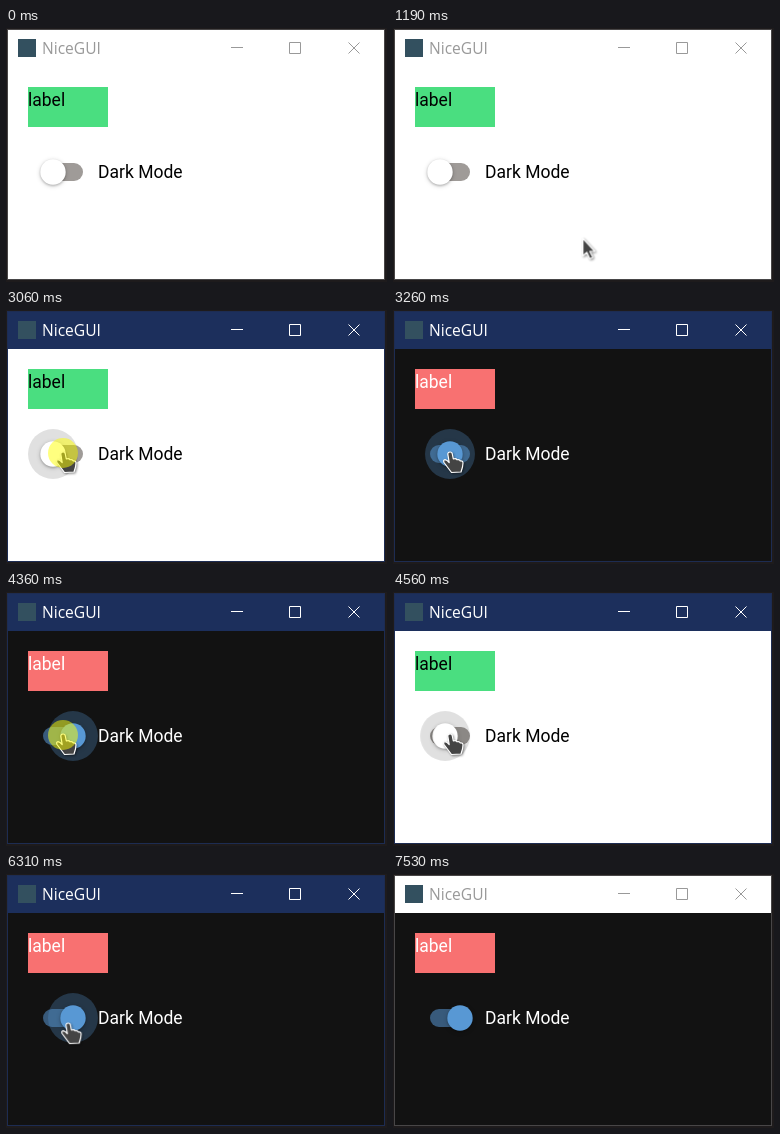
Recreate the animation shown at these times as an HTML page. Size 381x254 px, loop 7650 ms.

```html
<!DOCTYPE html>
<html lang="en">
<head>
<meta charset="utf-8">
<title>Dark mode switch</title>
<style>
  html, body { margin: 0; width: 100%; height: 100%; overflow: hidden; background: #1e1b1c; }
  svg { display: block; width: 100%; height: 100%; }

  /* Every animation shares one 7650 ms loop. */
  svg, svg .anim { animation: 7650ms linear infinite; }
  svg { animation-name: theme; animation-timing-function: step-end; }
  .frame { animation-name: focus !important; animation-timing-function: step-end !important; }
  .thumb { animation-name: slide !important; }
  .halo { animation-name: hover !important; transform-box: fill-box; transform-origin: center; }
  .cursor { animation-name: travel !important; }
  .arrow { animation-name: arrow !important; animation-timing-function: step-end !important; }
  .hand { animation-name: hand !important; animation-timing-function: step-end !important; }
  .press { animation-name: press !important; animation-timing-function: step-end !important; }

  .border { fill: var(--border); }
  .bar { fill: var(--bar); }
  .title { font: 15.6px "Open Sans", sans-serif; fill: var(--ink); }
  .buttons { fill: none; stroke: var(--ink); }
  .page { fill: var(--page); }
  .box { fill: var(--box); }
  .text { font: 17.5px Roboto, sans-serif; fill: var(--text); }
  .track { fill: var(--track); }
  .halo { fill: var(--halo); }
  .knob {
    fill: var(--knob);
    filter: drop-shadow(0 1px 1px rgba(0,0,0,.2)) drop-shadow(0 1px 2px rgba(0,0,0,.2));
  }
  .cursor path { fill: #444; stroke: #fff; stroke-width: 1.2; stroke-linejoin: round; }
  .cursor { filter: drop-shadow(1px 1px 1px rgba(0,0,0,.45)); }
  .press { fill: #ff0; fill-opacity: .5; }

  @keyframes theme {
    0%, 58.562% {
      --page: #fff; --box: #4ade80; --text: #000;
      --track: #9f9b98; --knob: #fff; --halo: rgba(0,0,0,.12);
    }
    41.569%, 78.301%, 100% {
      --page: #121212; --box: #f87171; --text: #fff;
      --track: #385a7b; --knob: #5898d4; --halo: rgba(88,152,212,.28);
    }
  }
  @keyframes focus {
    0%, 98.431%, 100% { --bar: #fff; --ink: #999; --border: #484647; }
    25.752% { --bar: #1c2f5c; --ink: #fff; --border: #1d2c52; }
  }
  @keyframes slide {
    0%, 41.569%, 60.784%, 78.301% {
      transform: translate(47px, 144px);
      animation-timing-function: cubic-bezier(.4, 0, .2, 1);
    }
    44.6%, 58.562%, 81.176%, 100% {
      transform: translate(67px, 144px);
      animation-timing-function: cubic-bezier(.4, 0, .2, 1);
    }
  }
  @keyframes hover {
    0%, 31.5% { transform: scale(0); animation-timing-function: cubic-bezier(0, 0, .2, 1); }
    34.4%, 84.183% { transform: scale(1); animation-timing-function: cubic-bezier(0, 0, .2, 1); }
    87.059%, 100% { transform: scale(0); }
  }
  @keyframes travel {
    0%, 14% { transform: translate(230px, 254px); animation-timing-function: ease-out; }
    17.647%, 28.889% { transform: translate(163px, 182px); animation-timing-function: ease-in-out; }
    33.7%, 81.961% { transform: translate(57px, 143px); }
    82.484% { transform: translate(62px, 150px); animation-timing-function: cubic-bezier(.3, .1, .7, .9); }
    88.235%, 100% { transform: translate(256px, 248px); }
  }
  @keyframes arrow {
    0%, 31.4%, 88.758%, 100% { visibility: hidden; }
    14.51%, 84.183% { visibility: visible; }
  }
  @keyframes hand {
    0%, 84.183%, 100% { visibility: hidden; }
    31.4% { visibility: visible; }
  }
  @keyframes press {
    0% { transform: translate(163px, 182px); visibility: hidden; }
    25.752% { transform: translate(163px, 182px); visibility: visible; }
    27.32%, 41.569%, 58.562%, 78.301%, 100% { transform: translate(57px, 143px); visibility: hidden; }
    40%, 56.993%, 76.209% { transform: translate(57px, 143px); visibility: visible; }
  }
</style>
</head>
<body>
<svg viewBox="0 0 381 254">
  <rect width="381" height="254" fill="#1e1b1c"/>
  <g class="anim frame">
    <rect class="border" x="1" y="1" width="378" height="251"/>
    <rect class="bar" x="2" y="2" width="376" height="37"/>
    <rect x="12" y="11" width="18" height="18" fill="#33505f"/>
    <text class="title" x="36" y="26">NiceGUI</text>
    <path class="buttons" d="M225 19.5h12M283.5 14.5h11v11h-11zM342.5 14.5l11 11m0-11l-11 11"/>
  </g>

  <rect class="page" x="2" y="39" width="376" height="212"/>
  <rect class="box" x="22" y="59" width="80" height="40"/>
  <text class="text" x="22" y="78">label</text>
  <text class="text" x="92" y="150">Dark Mode</text>

  <rect class="track" x="37" y="135" width="40" height="18" rx="9"/>
  <g class="anim thumb">
    <circle class="anim halo" r="25"/>
    <circle class="knob" r="12.7"/>
  </g>

  <g class="anim cursor">
    <path class="anim arrow" d="M.5 0V17.5L4.5 14L7.5 20.5L10.5 19L7.5 13H12.5Z"/>
    <path class="anim hand" d="M-2.2 1.2Q-2.2-1 0-1T2.3 1L3.3 6Q6 5 7 6.8Q9.5 6 10.3 8Q13 7.6 13 10L12.5 14L11 19L1.5 19.5L-1.5 15.5L-6 9.5Q-7 6.8-5 6.6Q-3 7-.8 9.5Z"/>
  </g>
  <circle class="anim press" r="15"/>
</svg>
</body>
</html>
```
